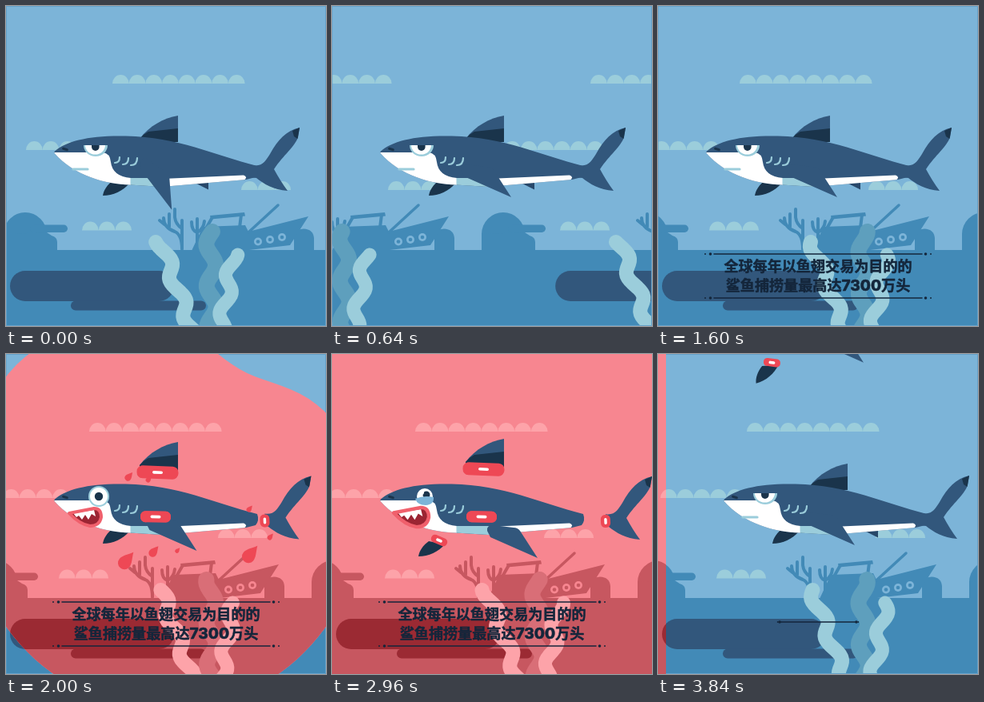
An HTML page with a canvas for the animation above (3920 ms loop, 400 by 400 pixels).

```html
<!DOCTYPE html>
<html lang="zh">
<head>
<meta charset="utf-8">
<style>
html, body { margin: 0; width: 100%; height: 100%; overflow: hidden; background: #7cb4d8; }
canvas { display: block; width: 400px; height: 400px; }
</style>
</head>
<body>
<canvas id="stage" width="400" height="400"></canvas>
<script>
const ctx = document.getElementById('stage').getContext('2d');
const LOOP = 3920, STEP = 80, TAU = Math.PI * 2;
const NAVY = '#32577c', DARK = '#1a344b', PALE = '#9bcddb', RED = '#ee4855', INK = '#14263b';
const BLUE = { sky: '#7cb4d8', cloud: PALE, ground: '#428ab7', pill: NAVY, weed: '#5e9fbd' };
const PINK = { sky: '#f78690', cloud: '#fda3a9', ground: '#c75760', pill: '#9b2a33', weed: '#d96e77' };

const clamp = v => Math.max(0, Math.min(1, v));
const span = (t, start, length) => clamp((t - start) / length);
const smooth = s => s * s * (3 - 2 * s);
const easeOut = s => 1 - (1 - s) * (1 - s);
const rise = (t, start) => -0.00113 * Math.max(0, t - start) ** 2;

function fill(d, color) {
  ctx.fillStyle = color;
  ctx.fill(new Path2D(d));
}
function stroke(d, color, width) {
  ctx.strokeStyle = color;
  ctx.lineWidth = width;
  ctx.lineCap = ctx.lineJoin = 'round';
  ctx.stroke(new Path2D(d));
}
function disc(x, y, r, color) {
  ctx.fillStyle = color;
  ctx.beginPath();
  ctx.arc(x, y, r, 0, TAU);
  ctx.fill();
}
function box(x, y, w, h, r, color) {
  ctx.fillStyle = color;
  ctx.beginPath();
  ctx.roundRect(x, y, w, h, r);
  ctx.fill();
}
function group(dx, dy, draw, angle = 0, px = 0, py = 0) {
  ctx.save();
  ctx.translate(dx + px, dy + py);
  ctx.rotate(angle);
  ctx.translate(-px, -py);
  draw();
  ctx.restore();
}
// Repeats a drawing along an endless strip.
function tile(offset, period, draw) {
  const base = offset % period;
  for (const k of [-1, 0, 1]) group(base + k * period, 0, draw);
}
function hermite(s, a, b, va, vb) {
  const s2 = s * s, s3 = s2 * s;
  return (2 * s3 - 3 * s2 + 1) * a + (s3 - 2 * s2 + s) * va + (3 * s2 - 2 * s3) * b + (s3 - s2) * vb;
}

// Distance the backdrop has travelled: cruise, slow to a stop, set off again.
function travel(t) {
  if (t < 640) return hermite(t / 640, 0, 190, 120, 222);
  if (t < 1600) return hermite((t - 640) / 960, 190, 383, 333, 12);
  return 383 + 2 * span(t, 1600, 400) + 7 * (Math.max(0, t - 3703) / 137) ** 2;
}

function cloud(x, base, bumps, color) {
  const w = 20.7;
  ctx.fillStyle = color;
  ctx.beginPath();
  for (let i = 0; i < bumps; i++) {
    ctx.moveTo(x + i * w, base);
    ctx.ellipse(x + (i + 0.5) * w, base, w / 2, 11, 0, Math.PI, TAU);
  }
  ctx.fill();
}

function landmarks(c) {
  const g = c.ground;
  disc(24, 285, 27, g);
  fill('M-3 285V306H64V295Q64 289 57 287L51 283Z', g);
  box(30, 273.5, 47, 9.5, 4.7, g);
  fill('M360 306V289Q361 279 372 278.5Q384 279 385 290V306Z', g);
  stroke('M197 265Q197 277 211 282Q220 286 220 304M204 260V276M211 254V264Q212 273 220 278M220 304V268M192 268L198 273', g, 4);
  stroke('M239 304V266M232 270Q232 281 239 283M248 269Q247 279 239 283', g, 4);
  fill('M232 306L246 276L299 274L303 282L378 263L355 299L304 305Z', g);
  fill('M255 262L298 258L299 262.5L256 266.5Z', g);
  stroke('M258 264L250 278M294 261L292 277', g, 4);
  stroke('M303 283L340 249', g, 3.5);
  for (const [x, y] of [[315, 294.5], [330, 292], [345, 289]]) {
    disc(x, y, 5, c.sky);
    disc(x, y, 2.3, g);
  }
}

function weed(top, y0, foot, color, width, wave, phase) {
  ctx.beginPath();
  for (let y = y0; y <= 412; y += 3) {
    const x = top + (foot - top) * (y - y0) / (400 - y0) + 5.8 * Math.sin((y - y0) * TAU / wave + phase);
    ctx.lineTo(x, y);
  }
  ctx.strokeStyle = color;
  ctx.lineWidth = width;
  ctx.lineCap = ctx.lineJoin = 'round';
  ctx.stroke();
}

function scene(t, c) {
  const d = travel(t), near = smooth(span(t, 0, 1460)), sway = -TAU * t / 730;
  ctx.fillStyle = c.sky;
  ctx.fillRect(0, 0, 400, 400);
  tile(d, 414, () => {
    cloud(133, 97, 8, c.cloud);
    cloud(25, 180, 6, c.cloud);
    cloud(294, 230, 3, c.cloud);
    cloud(95, 280.5, 3, c.cloud);
  });
  tile(d, 422, () => landmarks(c));
  ctx.fillStyle = c.ground;
  ctx.fillRect(0, 305, 400, 95);
  tile(near * 672, 672, () => box(5, 331, 205, 38, 19, c.pill));
  tile(near * 880, 880, () => box(81, 368.5, 169, 12, 6, c.pill));
  tile(near * 407, 407, () => {
    weed(193, 295, 231, c.cloud, 18, 48, -1.57 + sway);
    weed(256, 282, 257, c.weed, 20, 52, 2.8 + sway);
    weed(284, 311, 270, c.cloud, 17, 48, 1.6 + sway);
  });
}

function blobPath(t) {
  const reach = 363 * easeOut(span(t, 1760, 560));
  const bump = (a, center, width) => Math.exp(-(((a - center) / width) ** 2));
  ctx.beginPath();
  for (let i = 0; i < 120; i++) {
    const a = -Math.PI + i * TAU / 120;
    const r = reach * (1 - 0.17 * bump(a, -1.08, 0.4) + 0.08 * bump(a, -2.36, 0.5));
    ctx.lineTo(200 + r * Math.cos(a), 200 + r * Math.sin(a));
  }
  ctx.closePath();
}

function cut(x, y, w, h, angle = 0) {
  group(x, y, () => {
    box(-w / 2, -h / 2, w, h, Math.min(w, h) * 0.45, RED);
    const along = w > h, length = Math.max(w, h) > 30 ? 13 : 8;
    if (along) box(-length / 2, -1.8, length, 3.6, 1.8, '#fff');
    else box(-1.7, -length / 2, 3.4, length, 1.7, '#fff');
  }, angle);
}

function dorsal(low) {
  fill('M167 166C179 150 197 140 215 137V' + low + 'H167Z', NAVY);
  fill('M167 166Q172 160 178 157L215 153V' + low + 'H167Z', DARK);
}
function tail() {
  fill('M304 198C320 203 324 194 330 185C340 167 350 156 367 152L365 164C361 176 347 186 335 204C340 213 346 223 352 231C334 230 322 222 313 215L304 214Z', NAVY);
  fill('M358 156L367 152L364.5 166L360 163Z', DARK);
}
function farFin() {
  fill('M121 237C122 230 127 223 134 218L154 222C146 231 134 237 121 237Z', DARK);
}
function pectoral() {
  fill('M161 205Q160 198 168 198L194 201Q199 201 202 205L224 239L165 213Z', NAVY);
}

function body() {
  const outline = new Path2D('M60.5 182C75 168.5 105 161.5 150 162.5C215 164 260 186 314 200Q317 208 312 214L300 217L195 226L155 223.5C125 223 85 212 60.5 184Z');
  ctx.fillStyle = NAVY;
  ctx.fill(outline);
  ctx.save();
  ctx.clip(outline);
  fill('M55 183H121Q130 184 131 195Q133 213 156 215V230H55Z', '#fff');
  fill('M155.5 215H197V230H155.5Z', PALE);
  fill('M196 216L297 211.5Q303 214 297 218L196 230Z', '#fff');
  ctx.restore();
  group(74, 179, () => box(-4, -1.5, 8, 3, 1.5, DARK), 0.3);
  stroke('M142 189Q142 196 136 196M153 190Q153 198 146 198M164 190Q164 199 156 199', PALE, 2.2);
}

function calmFace() {
  fill('M97 174A15 14 0 0 0 127 174Z', PALE);
  fill('M99 174A12.5 11.5 0 0 0 124 174Z', '#fff');
  fill('M107 174V176A4.8 5 0 0 0 116.6 176V174Z', DARK);
  stroke('M84 204H102', PALE, 3.2);
}

function painFace(t) {
  if (t < 2400) {
    disc(116, 178, 13, PALE);
    disc(116, 178, 11, '#fff');
    disc(116, 178, 5.2, DARK);
  } else {
    disc(116, 178, 10, '#fff');
    disc(118, 176, 4.5, DARK);
    fill('M104 181Q115 176 127 179Q128 188 117 189Q107 189 104 181Z', '#7cb4d8');
    disc(112, 173, 3, '#fff');
  }
  const grow = 0.75 + 0.25 * easeOut(span(t, 1840, 160)) + 0.1 * span(t, 2000, 600);
  group(99, 204, () => {
    ctx.scale(grow, grow);
    ctx.translate(-99, -204);
    const mouth = 'M79 199L110 193Q119 193 119 204Q117 215 105 215Q92 213 79 199Z';
    fill(mouth, '#9b2533');
    fill('M84 199L110 195L112 203L107 200L103 207L99 201L95 207L91 202L88 204Z', '#fff');
    stroke(mouth, '#f0606c', 4);
  });
}

function calmShark(t) {
  farFin();
  fill('M236 221L253 229.5V219Z', '#28486a');
  dorsal(170);
  tail();
  body();
  const swing = 0.5 * (1 - smooth(span(t, 0, 320)));
  group(0, 0, pectoral, swing, 185, 214);
  calmFace();
}

function drops(t) {
  const k = (t - 1880) / 120, size = 1 - span(t, 2000, 320);
  if (k <= 0 || size <= 0) return;
  const spots = [
    [185, 165, 153, 154, 4], [185, 165, 178, 157, 3], [185, 205, 149, 260, 8], [185, 205, 184, 248, 5],
    [187, 205, 214, 246, 2.5], [313, 207, 304, 194, 3], [313, 207, 304, 252, 8], [313, 207, 330, 229, 3]
  ];
  for (const [ox, oy, x, y, r] of spots) {
    group(ox + (x - ox) * k, oy + (y - oy) * k, () => {
      ctx.scale(r * size, r * size);
      fill('M0 -2C.5 -1 1 -.5 1 .2A1 1 0 0 1 -1 .2C-1 -.5 -.5 -1 0 -2Z', RED);
    }, 0.7);
  }
}

function woundedShark(t) {
  const apart = easeOut(span(t, 1900, 400));
  const away = easeOut(span(t, 2100, 400));
  const fall = Math.max(0, t - 3200) / 240;
  const spin = Math.min(fall * fall, 1.5);

  const farRise = rise(t, 3398);
  group(-13 * away - farRise * 0.05, 16 * away + farRise, () => {
    farFin();
    if (t > 2100) cut(147, 217, 21, 10, 0.4);
  }, farRise * 0.0012, 140, 226);

  group(-16 * spin, 112 * fall * fall, () => {
    body();
    painFace(t);
    cut(187, 203.5, 38, 14, 0.02);
  }, -0.172 * spin, 187, 195);

  const finRise = rise(t, 3218);
  group(finRise * 0.09, -31 * easeOut(span(t, 1840, 250)) + finRise, () => {
    dorsal(176);
    cut(189.5, 175, 52, 16, 0.04);
  }, -finRise * 0.0007, 190, 160);

  const tailRise = rise(t, 3079);
  group(33 * apart, apart + tailRise, () => {
    ctx.save();
    ctx.beginPath();
    ctx.rect(309, 100, 80, 150);
    ctx.clip();
    tail();
    ctx.restore();
    cut(309, 208, 12, 16, -0.05);
  }, Math.max(-0.2, tailRise * 0.001), 309, 208);

  group(33 * apart, 16 * apart + rise(t, 3375), pectoral);
  if (!fall) cut(187, 203.5, 38, 14, 0.02);
  drops(t);
}

function rule(y, wide) {
  stroke(`M${200 - 130 * wide} ${y}H${200 + 130 * wide}`, INK, 1.5);
  for (const s of [-1, 1]) {
    disc(200 + s * 134.5 * wide, y, 1.8, INK);
    disc(200 + s * 141 * wide, y, 1, INK);
  }
}

function centered(parts, y) {
  const widths = parts.map(([text, font]) => (ctx.font = font, ctx.measureText(text).width));
  let x = 200 - widths.reduce((a, b) => a + b) / 2;
  parts.forEach(([text, font], i) => {
    ctx.font = font;
    ctx.fillText(text, x, y);
    ctx.strokeText(text, x, y);
    x += widths[i];
  });
}

function caption(t) {
  const wide = smooth(span(t, 960, 240)) * (1 - smooth(span(t, 3680, 268)));
  if (wide <= 0) return;
  const open = smooth(span(t, 1200, 320)) * (1 - smooth(span(t, 3360, 330)));
  const mid = 335 + 2.5 * open, gap = 27.5 * open;
  if (open > 0) {
    ctx.save();
    ctx.beginPath();
    ctx.rect(50, mid - gap, 300, gap * 2);
    ctx.clip();
    const han = '900 18.1px "Noto Sans CJK SC", "Noto Sans CJK", sans-serif';
    ctx.fillStyle = ctx.strokeStyle = INK;
    ctx.lineWidth = 0.5;
    ctx.textBaseline = 'alphabetic';
    centered([['全球每年以鱼翅交易为目的的', han]], 332);
    centered([['鲨鱼捕捞量最高达', han], ['7300', '800 19px Inter, sans-serif'], ['万头', han]], 355.5);
    ctx.restore();
  }
  rule(mid - gap, wide);
  if (gap > 0.5) rule(mid + gap, wide);
}

function draw(t) {
  scene(t, BLUE);
  ctx.strokeStyle = '#66a2c9';
  ctx.lineWidth = 1;
  ctx.strokeRect(0.5, 0.5, 399, 399);
  const edge = 400 * (1 - smooth(span(t, 3141, 771)));
  if (t > 1760 && edge > 0) {
    ctx.save();
    ctx.beginPath();
    ctx.rect(0, 0, Math.round(edge), 400);
    ctx.clip();
    blobPath(t);
    ctx.clip();
    scene(t, PINK);
    ctx.restore();
  }
  if (t < 1840) calmShark(t);
  else woundedShark(t);
  if (t > 3320) group(0.000744 * (4012 - t) ** 2, 0, () => calmShark(LOOP));
  caption(t);
}

function tick(now) {
  draw(Math.floor((now % LOOP) / STEP) * STEP);
  requestAnimationFrame(tick);
}
requestAnimationFrame(tick);
</script>
</body>
</html>
```
